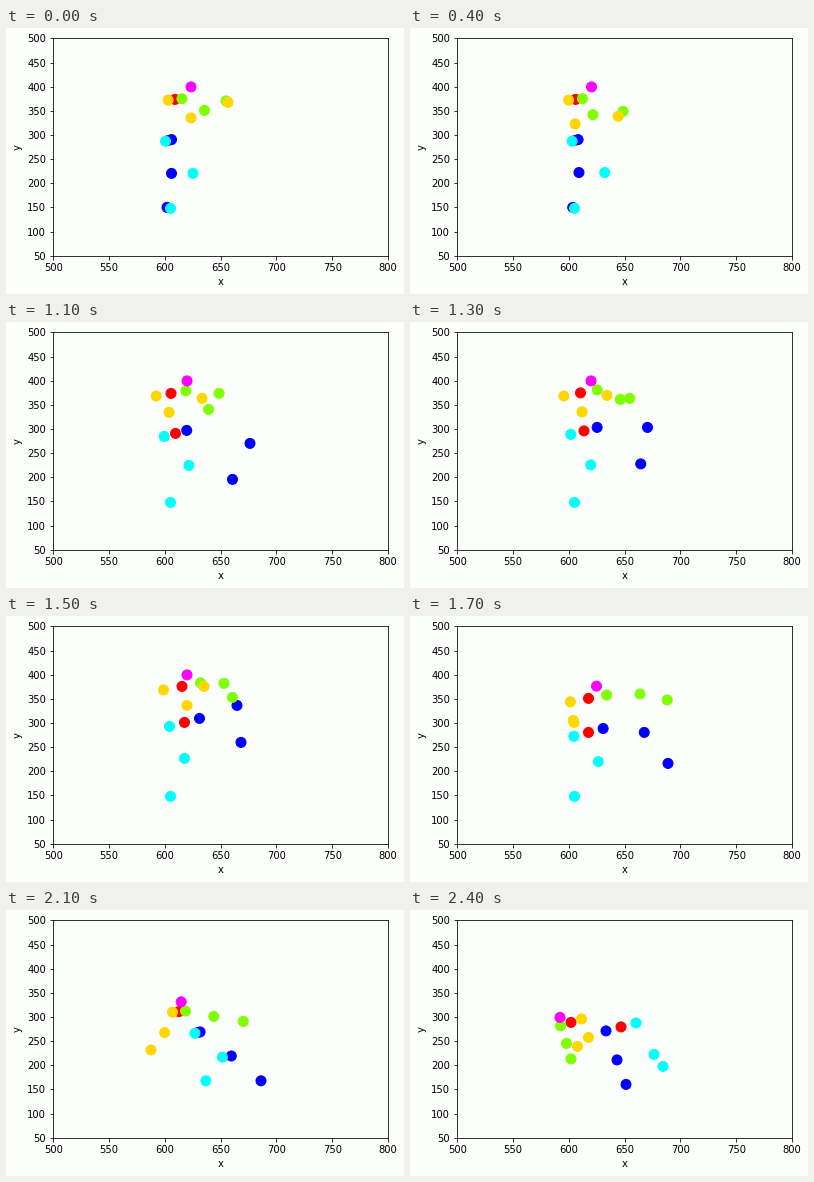
These frames come from a looping animation (398 by 266 pixels, 2500 ms). A matplotlib script:

```python
import numpy as np
import matplotlib.pyplot as plt
from matplotlib.animation import FuncAnimation

W, H, DPI = 398, 266, 72
FRAMES, INTERVAL = 25, 100
LEFT, BOTTOM, AX_W, AX_H = 47.2, 227.8, 334.8, 217.44
BACK = "#fcfefc"

# Steps of the five poses: stand, knee up, kick, land, turn away
POSES = [8, 11, 15, 19, 24]
t = np.arange(FRAMES)

plt.rcParams.update({"font.family": "DejaVu Sans", "font.size": 10})
fig = plt.figure(figsize=(W / DPI, H / DPI), dpi=DPI, facecolor=BACK)
ax = fig.add_axes([LEFT / W, 1 - BOTTOM / H, AX_W / W, AX_H / H], facecolor=BACK)
ax.set(xlim=(500, 800), ylim=(50, 500), xlabel="x", ylabel="y")


def path(*points, start=(0, 0)):
    """Move through the last poses; the start offset fades out quickly."""
    steps = POSES[-len(points):]
    xy = np.column_stack([np.interp(t, steps, c) for c in zip(*points)])
    return xy + np.exp(-t / 2)[:, None] * start


# The trunk turns from facing us (1) to facing away (-1)
turn = np.interp(t, POSES, [0.2, 0.75, 1, 0.95, -1])
neck = path((165, 71), (176, 70), (181, 94), (161, 112), start=(4, 0))
pelvis = path((165.5, 112), (169.5, 111), (178.5, 106), (178.5, 126),
              (211, 116.5), start=(-3, 0))
head = neck + path((16, -12.5), (5, -11.5), (11, -13), (-11, -5))

# Shoulders and hips lie on opposite sides of the spine
shoulder = np.column_stack([4 + 14.5 * turn, -3.5 * turn])
hip = np.column_stack([15 * turn, -4 * turn])

kick_leg = [
    pelvis + hip,
    path((169.5, 144), (244, 121), (231, 89), (237.5, 143), (207, 149.5),
         start=(-4, 1)),
    path((163, 179), (226.5, 157), (235, 126), (281, 168), (216, 174),
         start=(-2, 0)),
]
firm_leg = [
    pelvis - hip,
    path((196, 144), (183, 143), (178.5, 142), (198, 148.5), (244, 144),
         start=(-9, 1)),
    path((164.5, 180), (253, 156)),
]
front_arm = [
    neck + shoulder,
    path((180.5, 87), (202.5, 87), (218, 67), (242, 88), (156.5, 133),
         start=(18, -5)),
    path((212, 84.5), (213, 71), (226.5, 81), (288, 86), (161, 148.5),
         start=(8, -12)),
]
back_arm = [
    neck - shoulder,
    path((162, 96.5), (163, 90), (181, 89), (145.5, 119), (178.5, 127),
         start=(23, -7)),
    path((206, 90), (196, 76), (198, 70), (130, 142), (167.5, 136),
         start=(16, -16)),
]

parts = [
    ("red", [neck, pelvis]),
    ("blue", kick_leg),
    ("cyan", firm_leg),
    ("chartreuse", front_arm),
    ("gold", back_arm),
    ("magenta", [head]),
]
colors = [color for color, joints in parts for _ in joints]
pixels = np.stack([j for _, joints in parts for j in joints], axis=1)
x = 500 + (pixels[..., 0] - LEFT) * 300 / AX_W
y = 50 + (BOTTOM - pixels[..., 1] - 0.4) * 450 / AX_H
poses = np.stack([x, y], axis=-1)

dots = ax.scatter(*poses[0].T, s=100, c=colors)


def update(i):
    dots.set_offsets(poses[i])
    return [dots]


anim = FuncAnimation(fig, update, frames=FRAMES, interval=INTERVAL,
                     repeat=True, repeat_delay=0)
plt.show()
```
